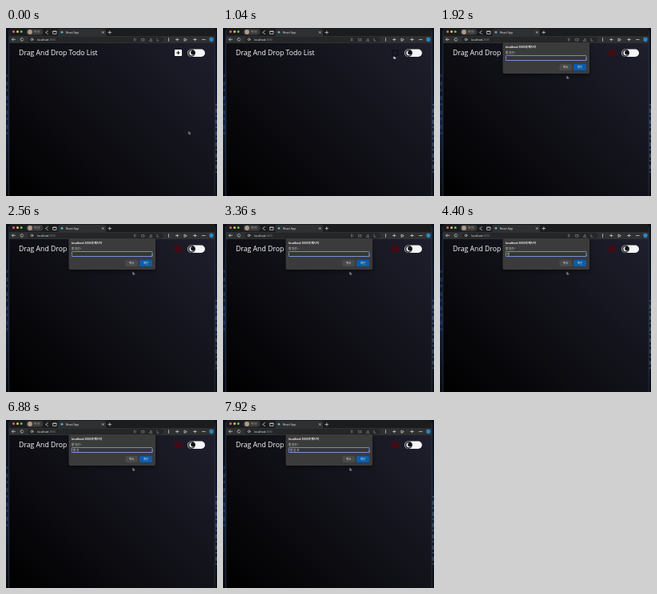
These frames come from a looping animation (264x210 px, 8000 ms). An HTML page:

```html
<!DOCTYPE html>
<html lang="ko">
<head>
<meta charset="utf-8">
<title>Drag And Drop Todo List</title>
<style>
html, body { margin: 0; width: 100%; height: 100%; overflow: hidden; background: #080b12; }
svg { display: block; width: 264px; height: 210px; }
text { font-family: "Noto Sans CJK KR", "Noto Sans", sans-serif; font-size: 3.4px; fill: #eee; white-space: pre; }
.title { font: 500 8.7px "Open Sans", "Noto Sans", sans-serif; fill: #fff; }
.line { fill: none; stroke: #ddd; stroke-width: .7; stroke-linecap: round; }
.add, .plus, .dialog, .ring, .cursor, .arrow, .hand { animation: 8s linear infinite; }
.add, .plus, .ring, .arrow, .hand { animation-timing-function: step-end; }
.add { animation-name: add; }
.plus { animation-name: plus; }
.dialog { animation-name: show; }
.ring { animation-name: focus; }
.cursor { animation-name: move; }
.arrow { animation-name: arrow; }
.hand { animation-name: hand; }
@keyframes add { 0% { fill: #fff } 11.5% { fill: #13131b } 15% { fill: #430b14 } 100% { fill: #430b14 } }
@keyframes plus { 0% { stroke: #08080c } 11.5% { stroke: #252530 } 15% { stroke: #4a0d16 } 100% { stroke: #4a0d16 } }
@keyframes show { 0%, 15% { opacity: 0 } 17.4%, 100% { opacity: 1 } }
@keyframes focus { 0% { opacity: 0 } 17.5% { opacity: 1 } 100% { opacity: 1 } }
@keyframes move {
  0%, 1% { transform: translate(228.500px, 129.500px); animation-timing-function: ease-in-out }
  11.8%, 18% { transform: translate(213.500px, 35px); animation-timing-function: ease-in-out }
  23%, 100% { transform: translate(158.500px, 60px) }
}
@keyframes arrow { 0% { opacity: 1 } 11.5% { opacity: 0 } 18% { opacity: 1 } 100% { opacity: 1 } }
@keyframes hand { 0% { opacity: 0 } 11.5% { opacity: 1 } 18% { opacity: 0 } 100% { opacity: 0 } }
</style>
</head>
<body>
<svg viewBox="0 0 264 210">
  <defs>
    <linearGradient id="page" gradientUnits="userSpaceOnUse" x1="20.5" y1="226.5" x2="244.5" y2="2.5">
      <stop offset="0" stop-color="#000"/><stop offset="1" stop-color="#1f1f2d"/>
    </linearGradient>
    <linearGradient id="wall" x2="0" y2="1">
      <stop offset="0" stop-color="#0b0f18"/><stop offset=".4" stop-color="#0c1628"/>
      <stop offset=".55" stop-color="#10203a"/><stop offset="1" stop-color="#070a10"/>
    </linearGradient>
    <filter id="soft" x="-20%" y="-30%" width="140%" height="170%"><feGaussianBlur stdDeviation="2"/></filter>
  </defs>

  <rect width="264" height="210" fill="url(#wall)"/>
  <path d="M1.500 58v75" stroke="#2c4f8c" stroke-width="1.500" stroke-dasharray="3 6 5 4" opacity=".7"/>
  <path d="M263 95v90" stroke="#8a8d92" stroke-width="1" stroke-dasharray="2 4 5 3" opacity=".7"/>
  <path d="M4 210V3q0-3 3-3H258q3 0 3 3V210z" fill="url(#page)"/>
  <path d="M3.700 210V3M261.300 210V3" stroke="#41485a" stroke-width=".6"/>

  <!-- browser bars -->
  <path d="M4 19V3q0-3 3-3H258q3 0 3 3V19z" fill="#1b1c1e"/>
  <rect x="4" y="10" width="257" height="9" fill="#2f3032"/>
  <path d="M64 10.200q1.500 0 1.500-1.500V3q0-2 2-2H123q2 0 2 2V8.700q0 1.500 1.500 1.500z" fill="#2f3032"/>
  <circle cx="9.500" cy="4.500" r="1.500" fill="#ed6a5e"/>
  <circle cx="14.500" cy="4.500" r="1.500" fill="#f4bf4f"/>
  <circle cx="19.200" cy="4.500" r="1.500" fill="#61c554"/>
  <rect x="25.500" y="1.300" width="21" height="7.500" rx="3.700" fill="#37383a"/>
  <circle cx="30" cy="5" r="2.900" fill="#b09a88"/>
  <text x="34.500" y="6.200" style="font-size:3px;fill:#d3a888">개인용</text>
  <path class="line" d="M52.500 3.500l-3 2 3 2M59 4h4v3.500h-4zM59 4.300h4"/>
  <circle cx="70" cy="5.300" r="1.400" fill="#58b8d0"/>
  <text x="75" y="6.600">React App</text>
  <path class="line" d="M120.300 4.500l2 2m0-2l-2 2M128 5.500h3.600M129.800 3.700v3.600"/>

  <rect x="27" y="11" width="170" height="7" rx="3.500" fill="#252628"/>
  <path class="line" d="M11.500 14.300h-4m1.600-1.600l-1.600 1.600 1.600 1.600M21.400 13.300a1.800 1.800 0 1 0 .2 1.700"/>
  <circle class="line" cx="32.500" cy="14.300" r="1.300"/>
  <text x="39" y="15.600">localhost<tspan fill="#858585">:3000</tspan></text>
  <path class="line" stroke-opacity=".5" d="M160.500 13v3m1.500-3v3M170 13.500h3v2.500h-3zM179.500 16l2-3 1 3zM189 13v3h2"/>
  <path class="line" d="M203.500 12.600v3.800M212.500 14.500h3.500M214.300 12.900v3M223 16v-3l3 1.500zM234.500 14.500h4M236.500 12.900v3M245.500 14.500h3.600"/>
  <path d="M254.500 12.500l2-1 3 1v3l-2 2-3-1.500z" fill="#2688c8"/>

  <!-- page -->
  <text class="title" x="16" y="33.500">Drag And Drop Todo List</text>
  <rect class="add" x="211" y="27" width="9" height="8" rx=".8"/>
  <path class="plus" d="M213.200 31h4.600M215.500 28.700v4.600" fill="none" stroke-width="1.100"/>
  <rect x="227" y="26.500" width="22" height="9.500" rx="4.750" fill="#f5f5f7"/>
  <circle cx="232.200" cy="31.200" r="4.700" fill="#3a3b40"/>
  <circle cx="232.500" cy="31.200" r="3" fill="#fff"/>
  <circle cx="233.900" cy="30.700" r="2.700" fill="#101014"/>

  <!-- prompt -->
  <g class="dialog">
    <rect x="78" y="20" width="109" height="39" rx="3" fill="#000" opacity=".45" filter="url(#soft)"/>
    <rect x="78.500" y="18" width="108.500" height="39" rx="2" fill="#3b3b3b"/>
    <text x="82" y="24.700" style="font-weight:700;fill:#fff">localhost:3000의 메시지</text>
    <text x="82" y="31.600">할 일은?</text>
    <rect x="82.500" y="34.500" width="100.500" height="6" rx=".8" fill="#363636"/>
    <path d="M82.500 40.500h100.500v-3" fill="none" stroke="#7893d6" stroke-width=".8"/>
    <rect class="ring" x="82.500" y="34.500" width="100.500" height="6" rx=".8" fill="none" stroke="#7893d6" stroke-width=".9"/>
    <text id="entry" x="84" y="38.900"></text>
    <rect x="149.500" y="45" width="15.500" height="8" rx="1.500" fill="#4a4a4a"/>
    <rect x="167" y="45" width="16" height="8" rx="1.500" fill="#0d5cac"/>
    <text x="157.200" y="50.200" text-anchor="middle">취소</text>
    <text x="175" y="50.200" text-anchor="middle">확인</text>
  </g>

  <g class="cursor">
    <path class="arrow" d="M0 0v3l.7-.6.500 1.100.6-.3-.5-1h1z" fill="#111" stroke="#fff" stroke-width=".45"/>
    <path class="hand" d="M0 .8q.5-.5.900 0v.8l1.400.3q.5.200.4.700l-.4.800h-1.700l-1.100-1.200.5-.3z" fill="#fff"/>
  </g>
</svg>
<script>
const entry = document.getElementById('entry');
const typed = [
  [0, ''], [3600, 'ㅎ'], [3920, '하'], [4240, '할'], [4560, '할 '],
  [4800, '할 ㅇ'], [5040, '할 이'], [5280, '할 일'], [6000, '할 일 '],
  [7200, '할 일 ㅊ'], [7920, '할 일 추']
];
function draw() {
  const t = performance.now() % 8000;
  const text = typed.filter(([at]) => at <= t).pop()[1];
  if (entry.textContent !== text) entry.textContent = text;
  requestAnimationFrame(draw);
}
draw();
</script>
</body>
</html>
```
